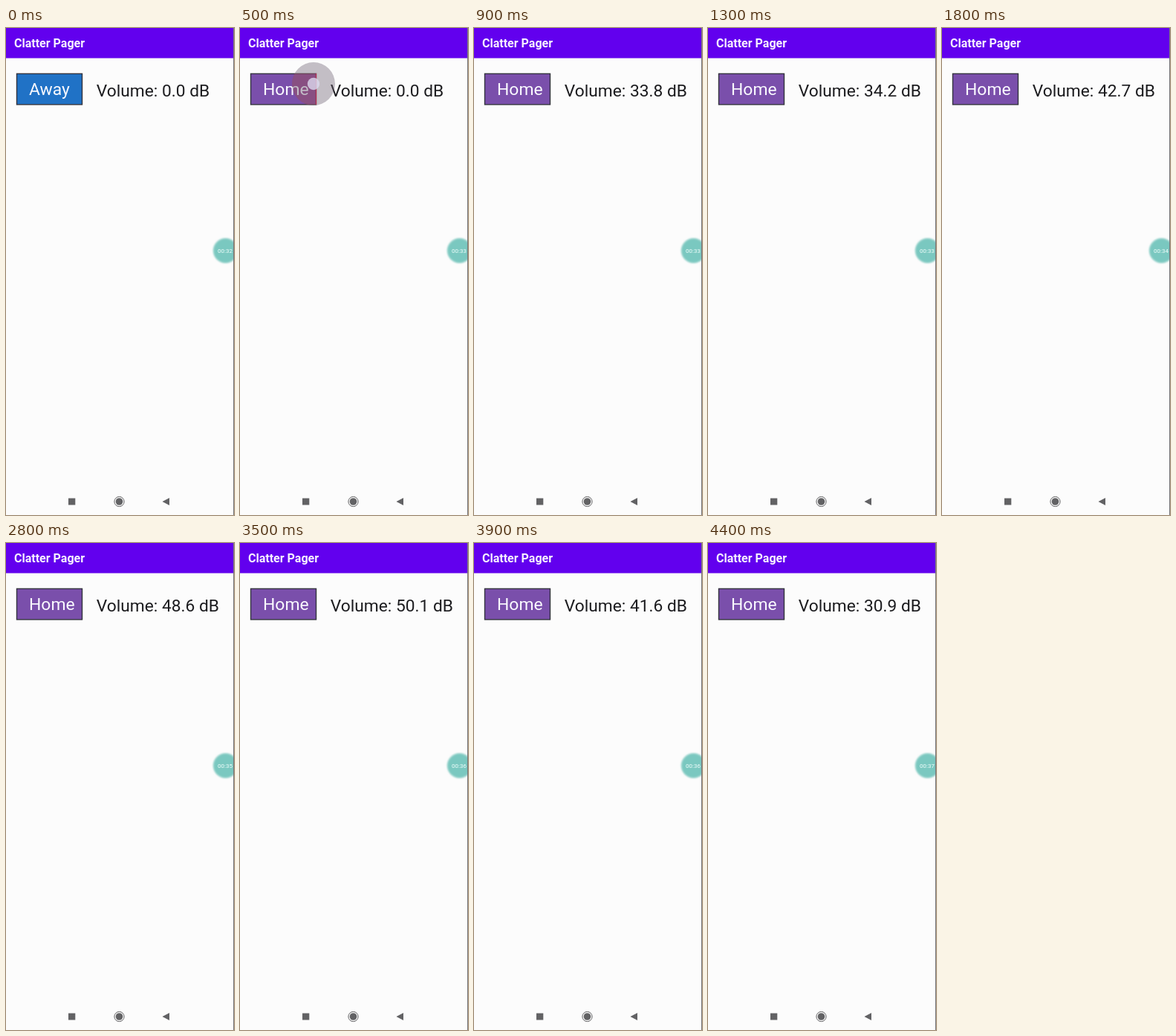
An HTML page for the animation above (4500 ms loop, 307 by 654 pixels).

```html
<!DOCTYPE html>
<html lang="en">
<head>
<meta charset="utf-8">
<title>Clatter Pager</title>
<style>
  html, body { margin: 0; width: 100%; height: 100%; overflow: hidden; background: #fcfcfc; }
  svg { display: block; width: 100%; height: 100%; }
  text { font-family: Roboto, "Liberation Sans", sans-serif; }
</style>
</head>
<body>
<svg viewBox="0 0 307 654">
  <defs>
    <clipPath id="inButton"><rect x="14" y="61" width="89" height="42"/></clipPath>
    <filter id="soft" x="-20%" y="-20%" width="140%" height="140%"><feGaussianBlur stdDeviation="0.8"/></filter>
    <filter id="screen" color-interpolation-filters="sRGB"><feGaussianBlur stdDeviation="0.35"/></filter>
  </defs>
  <g filter="url(#screen)">
    <rect x="-5" y="-5" width="317" height="664" fill="#fcfcfc"/>
    <rect x="-5" y="-5" width="317" height="45.5" fill="#6200ee"/>
    <text x="11" y="25.5" font-size="16" font-weight="700" fill="#f6f0ff">Clatter Pager</text>

    <rect id="button" x="14.5" y="61.4" width="88" height="41.4" stroke="#34343f" stroke-width="1.4"/>
    <g class="touch" clip-path="url(#inButton)">
      <circle cx="99" cy="75" r="29" fill="#d83058" fill-opacity="0.35"/>
    </g>
    <text id="label" x="31" y="90.4" font-size="22.9" fill="#fafaff"></text>
    <text id="volume" x="121.8" y="92" font-size="22.75" fill="#1c1c1f"></text>

    <g class="touch">
      <circle cx="99" cy="75" r="29" fill="#6c6070" fill-opacity="0.4"/>
      <path d="M102.5 61V103" stroke="#c02a50"/>
      <circle cx="99" cy="75" r="8.2" fill="#dcd8ee" fill-opacity="0.8"/>
    </g>

    <circle cx="295.6" cy="299" r="17" fill="#bfe3df" filter="url(#soft)"/>
    <circle cx="295.6" cy="299" r="16" fill="#7ac8c0" filter="url(#soft)"/>
    <text id="clock" x="285" y="302" font-size="8" fill="#f4fffd"></text>

    <g fill="#626264">
      <rect x="84" y="631.5" width="9.3" height="9"/>
      <circle cx="152.5" cy="636" r="6.6" fill="none" stroke="#626264"/>
      <circle cx="152.5" cy="636" r="4.8"/>
      <path d="M210.5 636L220 631V641Z"/>
    </g>
  </g>
  <rect x="306" width="1" height="654" fill="#77777b"/>
</svg>
<script>
  const LOOP = 4500, STEP = 100;
  const FIRST_READING = 7, HOME_STEP = 4;
  // one loudness reading per step
  const readings = [
    31.6, 31.6, 33.8, 32.5, 35.1, 33.0, 34.2, 36.9, 38.4, 41.2,
    40.3, 42.7, 44.1, 41.8, 43.6, 43.6, 45.2, 44.0, 46.7, 47.9,
    46.1, 48.6, 47.3, 49.4, 51.2, 48.8, 52.0, 49.7, 50.1, 47.5,
    45.8, 43.2, 41.6, 38.7, 36.4, 34.9, 32.3, 30.9
  ];
  const $ = id => document.getElementById(id);
  const button = $("button"), label = $("label"), volume = $("volume"), clock = $("clock");
  const touchParts = document.querySelectorAll(".touch");

  function touchOpacity(step) {
    if (step < 1 || step > 6) return 0;
    return step === 1 || step === 6 ? 0.5 : 1;
  }

  function draw(time) {
    const step = Math.floor((time % LOOP) / STEP);
    const home = step >= HOME_STEP;
    const level = step < FIRST_READING ? 0 : readings[step - FIRST_READING];
    button.setAttribute("fill", home ? "#7a4fab" : "#2072c6");
    label.textContent = home ? "Home" : "Away";
    volume.textContent = `Volume: ${level.toFixed(1)} dB`;
    clock.textContent = `00:${32 + Math.floor((step + 6) / 10)}`;
    touchParts.forEach(part => part.setAttribute("opacity", touchOpacity(step)));
  }

  let start;
  function tick(now) {
    start ??= now;
    draw(now - start);
    requestAnimationFrame(tick);
  }
  draw(0);
  requestAnimationFrame(tick);
</script>
</body>
</html>
```
